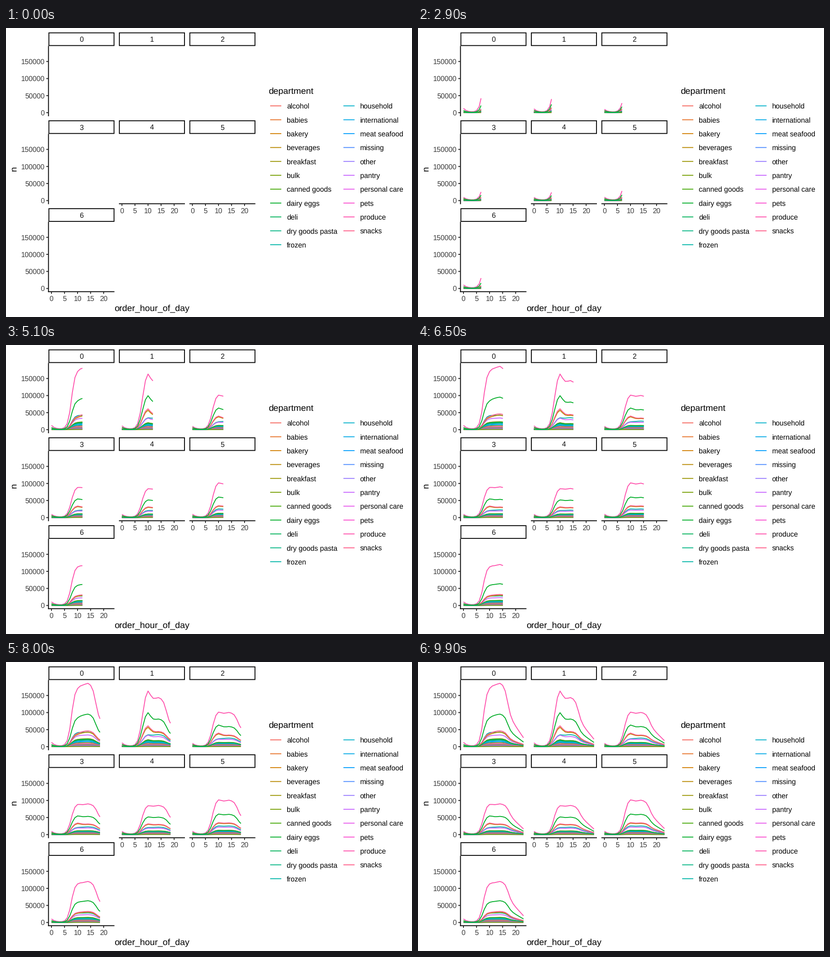
Recreate the animation shown at these times as a matplotlib script. Size 885 px wide and 632 px high, loop 10000 ms.

```python
import numpy as np
import matplotlib.pyplot as plt
from matplotlib.animation import FuncAnimation
from matplotlib.patches import Rectangle

W, H, DPI = 885, 632, 100
PX = 72 / DPI
LW = 1.88 * PX
FRAMES = 100
HOURS = np.arange(24)

plt.rcParams.update({"font.family": "Liberation Sans", "path.snap": False,
                     "text.hinting": "no_hinting"})

# Per weekday: midday produce orders (thousands), size of the 10:00 peak,
# and how much the day feels like a weekend
LEVEL = [181, 140, 97.5, 87.5, 83, 98, 117]
PEAK = [-.02, .2, .07, .04, .05, .07, 0]
WEEKEND = [1, .4, .1, .05, 0, .1, .8]

# Share of produce, weekend drop, morning skew
LARGE = {
    "produce": (1, 0, 0),
    "frozen": (.255, .1, -.6),
    "pantry": (.22, .16, 0),
    "beverages": (.335, .32, .9),
    "snacks": (.35, .29, 1),
    "dairy eggs": (.597, .14, .4),
}
# From largest to smallest
SMALL = ["bakery", "canned goods", "deli", "dry goods pasta", "household",
         "meat seafood", "breakfast", "personal care", "babies",
         "international", "alcohol", "pets", "missing", "other", "bulk"]
NAMES = sorted([*LARGE, *SMALL])
DRAW_ORDER = sorted([*LARGE, *SMALL], key=lambda d: d in ("dairy eggs", "deli"))


def darken(c):
    return tuple(np.power(c, 1.22))


def hcl(hue, chroma=100, lum=65):
    """Polar CIE-LUV colour to clipped sRGB."""
    a = np.radians(hue)
    y = ((lum + 16) / 116) ** 3
    u = chroma * np.cos(a) / (13 * lum) + 0.19784
    v = chroma * np.sin(a) / (13 * lum) + 0.46834
    x = 9 * y * u / (4 * v)
    z = y * (12 - 3 * u - 20 * v) / (4 * v)
    rgb = np.array([[3.2405, -1.5371, -0.4985],
                    [-0.9693, 1.8760, 0.0416],
                    [0.0556, -0.2040, 1.0572]]) @ [x, y, z]
    rgb = np.clip(rgb, 0, 1)
    return np.where(rgb <= .0031308, 12.92 * rgb,
                    1.055 * rgb ** (1 / 2.4) - .055)


COLORS = {d: darken(hcl(15 + 360 * i / len(NAMES))) for i, d in enumerate(NAMES)}
GRAY, TICK, STRIP = (darken([g] * 3) for g in (.302, .2, .1))


def sigmoid(x):
    return 1 / (1 + np.exp(-x))


def bump(center, width):
    return np.exp(-((HOURS - center) / width) ** 2)


def produce(day):
    """Night leftovers, a morning rise, a plateau and an evening decline."""
    level, peak = LEVEL[day], PEAK[day]
    late = 110 / level - .55
    night = (5 + .033 * level) * np.exp(-HOURS / 1.25) + 1.5
    rise = sigmoid(1.38 * (HOURS - max(7.5, 7.6 - 5 * peak)))
    plateau = rise + peak * bump(9.8, 1.3) + .03 * bump(14, 1.2)
    tail = (.14 + .06 * (23 - HOURS)) * (1 + .5 * late)
    fall = 1 - (1 - tail) * sigmoid(1.6 * (HOURS - 16.7 - .55 * late))
    return night * (1 - rise) + level * plateau * fall


def orders(dept, day):
    if dept in SMALL:
        return produce(day) * .125 * np.exp(-(SMALL.index(dept) / 7.2) ** 2)
    share, drop, skew = LARGE[dept]
    morning = np.interp(HOURS, [10, 12.5], [1, 0])
    fresh = .26 - .05 * (day or 7)  # the morning habit fades over the week
    return (produce(day) * share * (1 - drop * WEEKEND[day])
            * (1 + skew * fresh * morning))


fig = plt.figure(figsize=(W / DPI, H / DPI), dpi=DPI, facecolor="white")
ax = fig.add_axes([0, 0, 1, 1])
ax.set(xlim=(0, W), ylim=(H, 0))
ax.axis("off")


def line(x, y, color="black"):
    return ax.plot(x, y, color=color, lw=LW, solid_capstyle="butt",
                   solid_joinstyle="round")[0]


def label(x, y, text, size=15.5, color="black", ha="left", **kw):
    ax.text(x, y, text, fontsize=size * PX, color=color, ha=ha,
            va="baseline", **kw)


PANEL_W, PANEL_H = 143.8, 152.8
STEP_X, STEP_Y = 153.6, 192.25
HOUR_PX, K_PX = 5.69, .746


def panel(day):
    """Strip, axes and empty curves of one weekday."""
    row, col = divmod(day, 3)
    left, top = 92.6 + col * STEP_X, 39.3 + row * STEP_Y
    right, bottom = left + PANEL_W, top + PANEL_H
    x0, y0 = left + 6.5, bottom - 6.95

    curves = []
    for dept in DRAW_ORDER:
        ys = y0 - K_PX * orders(dept, day)
        curves.append((line([], [], COLORS[dept]), x0, ys))

    ax.add_patch(Rectangle((left + .9, top - 28.7), PANEL_W - 1.8, 27.8,
                           fill=False, ec="black", lw=LW, joinstyle="miter"))
    label((left + right) / 2, top - 9.1, str(day), color=STRIP, ha="center")

    if col == 0:
        line([left, left], [top, bottom + .9])
        for n in range(0, 150001, 50000):
            y = y0 - K_PX * n / 1000
            line([left - 4.8, left], [y, y], TICK)
            label(left - 8.2, y + 5.6, str(n), color=GRAY, ha="right")
    if day >= 4:
        line([left - .9 * (col == 0), right], [bottom, bottom])
        for h in range(0, 21, 5):
            x = x0 + HOUR_PX * h
            line([x, x], [bottom, bottom + 4.8], TICK)
            label(x, bottom + 20, str(h), color=GRAY, ha="center")
    return curves


def legend():
    label(572.5, 143.7, "department", 19.35)
    for i, dept in enumerate(NAMES):
        col, row = divmod(i, 11)
        x, y = 575.8 + 159.7 * col, 170.3 + 30.36 * row
        line([x, x + 24.3], [y, y], COLORS[dept])
        label(x + 36.3, y + 5.7, dept)


curves = [c for day in range(7) for c in panel(day)]
legend()
label(318.1, 619, "order_hour_of_day", 19.35, ha="center")
label(23, 308, "n", 19.35, ha="center", rotation=90, rotation_mode="anchor")


def update(i):
    now = 23 * i / (FRAMES - 1)
    hours = np.append(HOURS[HOURS < now], now) if i else np.array([])
    for curve, x0, ys in curves:
        curve.set_data(x0 + HOUR_PX * hours, np.interp(hours, HOURS, ys))
    return [c[0] for c in curves]


anim = FuncAnimation(fig, update, frames=FRAMES, interval=100, repeat=True,
                     repeat_delay=0, blit=False)
plt.show()
```
